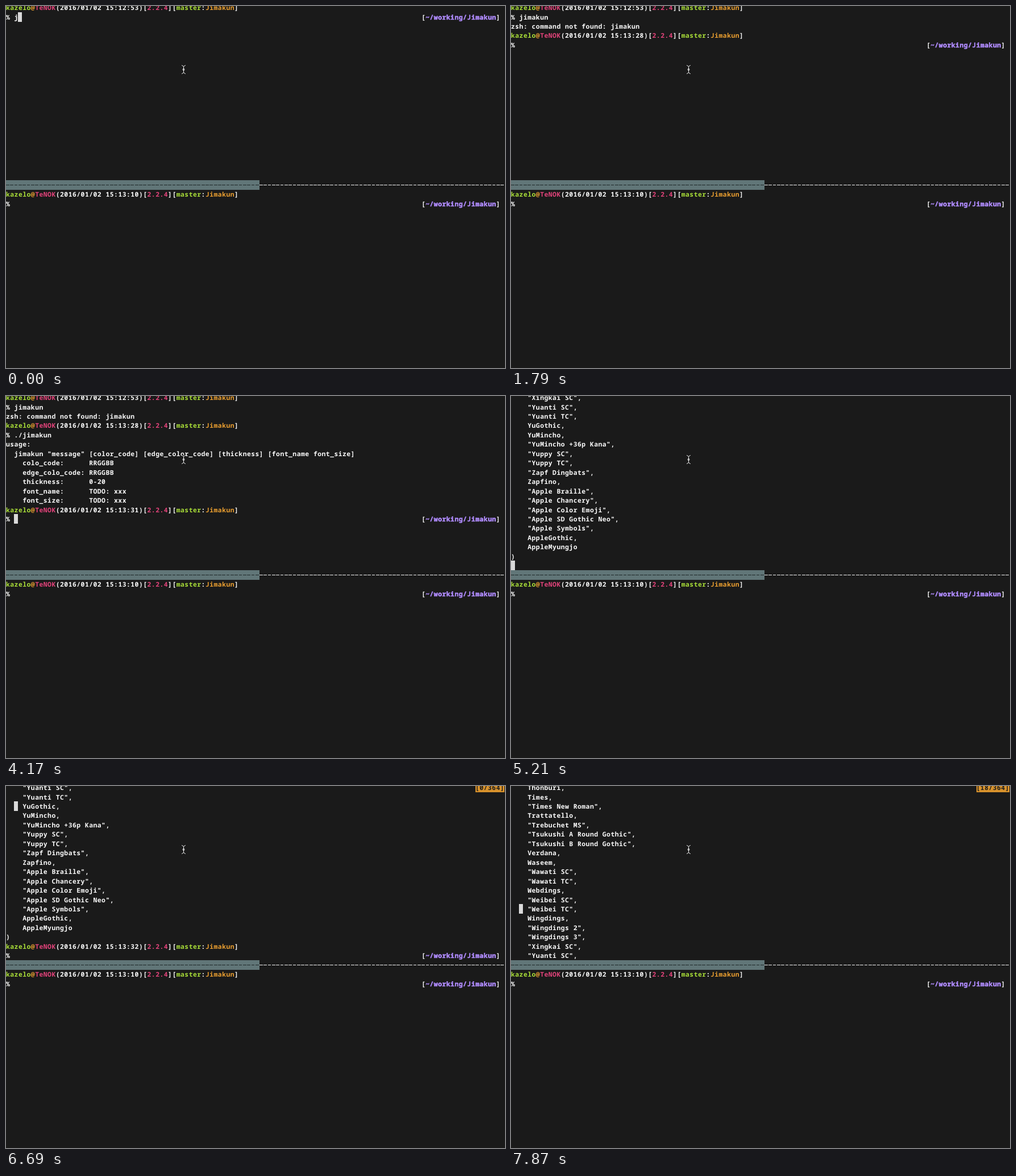
Recreate the animation shown at these times as an HTML page. Size 878 px wide and 638 px high, loop 8000 ms.

```html
<!DOCTYPE html>
<html lang="en">
<head>
<meta charset="utf-8">
<title>Terminal session</title>
<style>
  :root { --col: 7.315px; --row: 16.45px; --bg: #1a1a1a; }
  html, body { margin: 0; width: 100%; height: 100%; overflow: hidden; background: var(--bg); }
  #stage { position: relative; width: 878px; height: 638px; overflow: hidden; }
  #stage > * { position: absolute; }
  #text, #badge {
    margin: 0; white-space: pre; color: #fafafa;
    font: 600 11.4px/var(--row) "Noto Sans Mono", "DejaVu Sans Mono", monospace;
    letter-spacing: calc(var(--col) - .6em);
    text-rendering: geometricPrecision;
  }
  #text { left: 0; top: -3.95px; }
  #text b { font-weight: inherit; }
  #text .green { color: #a9de38; }
  #text .orange { color: #eb9f30; }
  #text .pink { color: #e2437a; }
  #text .path { color: #b18cff; font-weight: 800; -webkit-text-stroke: .5px; }
  #badge { top: -3.95px; height: 15px; right: 1px; background: #d8922c; color: #1a1a1a; }
  #cursor { width: 7px; height: 17px; background: #d9d9d9; }
  #active { left: 0; top: 307px; width: 446px; height: 17px; background: #617678; }
  .dashes {
    top: 315px; height: 1px;
    background: repeating-linear-gradient(90deg, var(--ink) 0 5.8px, transparent 5.8px var(--col));
  }
</style>
</head>
<body>
<div id="stage">
  <div id="active"></div>
  <div class="dashes" style="left:0;width:446px;--ink:#1d2728"></div>
  <div class="dashes" style="left:446px;width:431px;--ink:#f4f4f4"></div>
  <pre id="text"></pre>
  <div id="badge"></div>
  <div id="cursor"></div>
  <svg style="left:305px;top:103px" width="15" height="18" fill="none">
    <defs>
      <path id="beam" d="M4 1.5Q7.5 2 7.5 5Q7.5 2 11 1.5M7.5 5V13M4 16.5Q7.5 16 7.5 13Q7.5 16 11 16.5M7.5 6.5L5.8 9L7.5 11.5L9.2 9Z"/>
    </defs>
    <use href="#beam" stroke="#111" stroke-width="2.6"/>
    <use href="#beam" stroke="#e8e8e8"/>
  </svg>
</div>
<script>
const LOOP = 8000, COL = 7.315, ROW = 16.45, TOP = -5.45, ROWS = 19;
const $ = id => document.getElementById(id);
const tint = (name, s) => `<b class="${name}">${s}</b>`;

const header = time =>
  tint('green', 'kazelo') + tint('orange', '@') + tint('pink', 'TeNOK') +
  `(2016/01/02 ${time})[${tint('pink', '2.2.4')}][` +
  tint('green', 'master') + ':' + tint('orange', 'Jimakun') + ']';
const prompt = (typed = '') =>
  ('% ' + typed).padEnd(100) + `[${tint('path', '~/working/Jimakun')}]`;

const first = [header('15:12:53')];
const failed = [...first, '% jimakun', 'zsh: command not found: jimakun'];
const second = [...failed, header('15:13:28')];
const ran = [...second, '% ./jimakun'];
const usage = [
  ...ran,
  'usage:',
  '  jimakun "message" [color_code] [edge_color_code] [thickness] [font_name font_size]',
  '    colo_code:      RRGGBB',
  '    edge_colo_code: RRGGBB',
  '    thickness:      0-20',
  '    font_name:      TODO: xxx',
  '    font_size:      TODO: xxx'
];
const third = [...usage, header('15:13:31')];

const fonts = `Thonburi|Times|Times New Roman|Trattatello|Trebuchet MS|Tsukushi A Round Gothic
Tsukushi B Round Gothic|Verdana|Waseem|Wawati SC|Wawati TC|Webdings|Weibei SC|Weibei TC|Wingdings
Wingdings 2|Wingdings 3|Xingkai SC|Yuanti SC|Yuanti TC|YuGothic|YuMincho|YuMincho +36p Kana
Yuppy SC|Yuppy TC|Zapf Dingbats|Zapfino|Apple Braille|Apple Chancery|Apple Color Emoji
Apple SD Gothic Neo|Apple Symbols|AppleGothic|AppleMyungjo`.split(/[|\n]/);
const list = fonts.map((f, i) =>
  '    ' + (f.includes(' ') ? `"${f}"` : f) + (i < fonts.length - 1 ? ',' : '')).concat(')');
const done = [...list, header('15:13:32'), prompt()];
const view = (lines, scroll = 0) => {
  const end = lines.length - scroll;
  return lines.slice(end - ROWS, end);
};

// A scene is { lines, at: [column, row] of the cursor, scroll, fade }.
const type = (before, typed) =>
  ({ lines: [...before, prompt(typed)], at: [2 + typed.length, before.length] });
const wait = lines => ({ lines: [...lines, ''], at: [0, lines.length] });
const copy = (scroll, row, fade = 1) =>
  ({ lines: view(done, scroll), at: row === null ? null : [2, row], scroll, fade });

const scenes = [
  [0, type(first, 'j')],
  [150, type(first, 'jim')],
  [300, type(first, 'jima')],
  [450, type(first, 'jimaku')],
  [600, type(first, 'jimakun')],
  [1040, wait(failed)],
  [1190, type(second, '')],
  [1790, { ...type(second, ''), at: null }],
  [2540, type(second, '.')],
  [2690, type(second, './')],
  [2840, type(second, './ji')],
  [3280, type(second, './jim')],
  [3580, type(second, './jimak')],
  [3730, type(second, './jimakun')],
  [3880, wait(ran)],
  [4030, wait(usage)],
  [4170, type(third, '')],
  [4760, type(third, './')],
  [4910, type(third, './jimakun')],
  [5060, wait([...third, '% ./jimakun'])],
  [5210, { lines: view([...list, '']), at: [0, 18] }],
  [5360, { lines: view(done), at: [2, 18] }],
  [6100, copy(0, null)],
  [6250, copy(0, 17)],
  [6540, copy(0, 7)],
  [6690, copy(0, 2)],
  [6830, copy(3, 0)],
  [6980, copy(8, 0, .6)],
  [7130, copy(13, 0)],
  [7280, copy(18, 1)],
  [7580, copy(18, 5)],
  [7730, copy(18, 9)],
  [7870, copy(18, 13)]
];

const lower = [header('15:13:10'), prompt()];
let shown;

function draw({ lines, at, scroll, fade = 1 }) {
  const upper = Array.from({ length: ROWS }, (_, i) => lines[i] || '');
  $('text').innerHTML = [...upper, '', ...lower].join('\n');
  $('badge').hidden = scroll === undefined;
  $('badge').textContent = `[${scroll}/364]`;
  $('cursor').hidden = !at;
  if (at) {
    $('cursor').style.left = Math.floor(at[0] * COL) + 'px';
    $('cursor').style.top = Math.floor(at[1] * ROW + TOP) + 'px';
    $('cursor').style.opacity = fade;
  }
}

function tick() {
  const t = performance.now() % LOOP;
  const scene = scenes.findLast(([start]) => start <= t)[1];
  if (scene !== shown) draw(shown = scene);
  requestAnimationFrame(tick);
}
tick();
</script>
</body>
</html>
```
